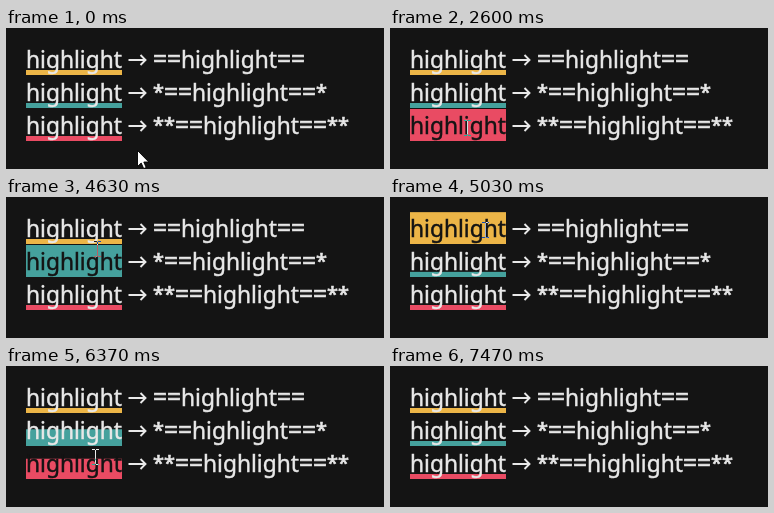
Animation of 378x141 px, one loop 8.06 s. Source, as an HTML page:

```html
<!DOCTYPE html>
<html lang="en">
<head>
<meta charset="utf-8">
<title>Highlight hover</title>
<style>
  html, body { margin: 0; width: 100%; height: 100%; overflow: hidden; background: #141414; }
  svg { display: block; width: 378px; height: 141px; background: #141414; isolation: isolate; color: #e8e8e8; }
  text {
    font: 22.75px "Noto Sans", sans-serif; white-space: pre;
    fill: currentColor; stroke: currentColor; stroke-width: .45;
  }
  .equals { font-size: 24.5px; stroke-width: .7; }
  .star { font-size: 20px; stroke-width: .7; }
  .arrow { fill: none; stroke: currentColor; stroke-width: 1.9; }
  .bar { transform-box: fill-box; transform-origin: 50% 100%; }
  #beam { mix-blend-mode: difference; fill: #fff; shape-rendering: crispEdges; }
</style>
</head>
<body>
<svg viewBox="0 0 378 141">
  <g id="lines"></g>
  <g id="beam">
    <path d="M0-7h1v14h-1zM-3-8h3v1h-3zM1-8h3v1h-3zM-3 7h3v1h-3zM1 7h3v1h-3z"/>
  </g>
  <g id="pointer">
    <path d="M.5.5V16.5L4.2 13 6.7 18.6 9.2 17.5 6.8 12H11.8Z" fill="#fff" stroke="#000" stroke-width=".9"/>
  </g>
</svg>
<script>
const LOOP = 8060, TICK = 10, FADE = 400;
const LEFT = 20, TOP = 15, PITCH = 33, WORD = 96, BAR = 32, REST = 5 / BAR;
const EQUALS = 28, STAR = 11;
const BG = '#141414', INK = '#e8e8e8';
const colors = ['#ecb547', '#45a19d', '#e94b63'];

// The pointer glides to each stop between two times.
const start = { x: 131, y: 122 };
const moves = [
  { from: 1440, to: 1730, x: 157, y: 91 },
  { from: 1900, to: 2470, x: 77, y: 100 },
  { from: 3170, to: 3570, x: 86, y: 73 },
  { from: 4400, to: 4840, x: 95, y: 33 },
  { from: 5800, to: 5960, x: 91, y: 64 },
  { from: 5960, to: 6530, x: 88, y: 98 },
  { from: 6900, to: 7290, x: 93, y: 143 },
];

function pointerAt(time) {
  let { x, y } = start;
  for (const move of moves) {
    const t = Math.min(1, Math.max(0, (time - move.from) / (move.to - move.from)));
    const eased = t * t * (3 - 2 * t);
    x += (move.x - x) * eased;
    y += (move.y - y) * eased;
  }
  return { x: Math.round(x), y: Math.round(y) };
}

const track = Array.from({ length: LOOP / TICK }, (_, i) => ({ time: i * TICK, ...pointerAt(i * TICK) }));
const lineUnder = ({ x, y }) => x < LEFT + WORD ? Math.floor((y - TOP) / PITCH) : -1;

// Spans of time in which the pointer is over a line's word.
function hoversOf(line) {
  const inside = track.map(p => lineUnder(p) === line);
  const edges = track.filter((_, i) => i && inside[i] !== inside[i - 1]).map(p => p.time);
  return edges.flatMap((time, i) => i % 2 ? [] : [[time, edges[i + 1]]]);
}

const loop = (el, frames) => el.animate(
  frames.map(([time, props, easing = 'linear']) => ({ offset: time / LOOP, easing, ...props })),
  { duration: LOOP, iterations: Infinity });

// Hard changes: list of [time, props].
const hold = (el, steps) =>
  loop(el, [...steps, [LOOP, steps.at(-1)[1]]].map(([t, p]) => [t, p, 'steps(1, end)']));

function add(parent, tag, attrs, content = '') {
  const el = document.createElementNS('http://www.w3.org/2000/svg', tag);
  for (const key in attrs) el.setAttribute(key, attrs[key]);
  el.textContent = content;
  return parent.appendChild(el);
}

function animateHover(bar, word, hovers) {
  const low = { transform: `scaleY(${REST})` }, full = { transform: 'scaleY(1)' };
  const grow = [[0, low]], tint = [[0, { color: INK }]];
  for (const [enter, leave] of hovers) {
    const grown = Math.min(enter + FADE, leave);
    grow.push([enter, low, 'ease'], [grown, full], [leave, full, 'ease'], [leave + FADE, low]);
    tint.push([enter, { color: BG }], [leave, { color: INK }]);
  }
  loop(bar, [...grow, [LOOP, low]]);
  hold(word, tint);
}

const root = document.getElementById('lines');

colors.forEach((fill, i) => {
  const g = add(root, 'g', { transform: `translate(0 ${i * PITCH})` });
  const bar = add(g, 'rect', { class: 'bar', x: LEFT, y: TOP, width: WORD, height: BAR, fill });
  const word = add(g, 'text', { x: LEFT, y: 40 }, 'highlight');
  add(g, 'path', { class: 'arrow', d: 'M122.5 32H139.5M134.5 27L139.5 32 134.5 37' });

  let x = 147;
  const put = (content, width, cls, y = 40) => {
    add(g, 'text', { x, y, class: cls }, content);
    x += width;
  };
  const stars = '*'.repeat(i);
  put(stars, i * STAR, 'star', 38);
  put('==', EQUALS, 'equals');
  put('highlight', WORD, 'word');
  put('==', EQUALS, 'equals');
  put(stars, i * STAR, 'star', 38);

  animateHover(bar, word, hoversOf(i));
});

// The text cursor replaces the arrow while beside the lines.
const textEnd = TOP + colors.length * PITCH;
for (const id of ['beam', 'pointer']) {
  hold(document.getElementById(id), track.map(({ time, x, y }) => [time, {
    transform: `translate(${x}px, ${y}px)`,
    opacity: (y < textEnd) === (id === 'beam') ? 1 : 0,
  }]));
}
</script>
</body>
</html>
```
